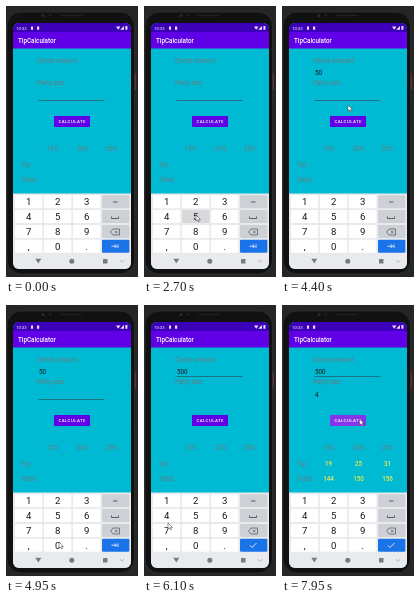
Recreate the animation shown at these times as an HTML page. Size 132x271 px, loop 8 s.

```html
<!DOCTYPE html>
<html lang="en">
<head>
<meta charset="utf-8">
<title>TipCalculator</title>
<style>
html, body { margin: 0; width: 100%; height: 100%; overflow: hidden; background: #262626; }
svg { display: block; width: 132px; height: 271px; }
text { font-family: Roboto, "Noto Sans", sans-serif; font-size: 6.3px; }
.label { fill: #6b7b80; }
.value { fill: #ece84e; font-weight: 500; text-anchor: middle; }
.digit { font-size: 9.6px; fill: #161616; text-anchor: middle; }
.icon { fill: none; stroke: #50545a; stroke-width: .9; }
</style>
</head>
<body>
<svg viewBox="0 0 132 271" xmlns="http://www.w3.org/2000/svg">
  <defs>
    <clipPath id="screen"><rect x="7" y="17" width="118" height="246" rx="6"/></clipPath>
    <clipPath id="face"><rect x="48" y="110" width="36" height="11" rx="1"/></clipPath>
  </defs>
  <rect x="127.5" y="67" width="2" height="17" rx=".8" fill="#84483a"/>
  <rect x="127.5" y="94" width="2" height="29" rx=".8" fill="#1c1c1c"/>
  <rect x="1" y="6" width="127.500" height="262" rx="14" fill="#111" stroke="#303030" stroke-width=".8"/>
  <rect x="54" y="9" width="22" height="1.2" rx=".6" fill="#222"/>
  <g fill="#2b2b2b"><circle cx="37" cy="9.500" r="1.500"/><circle cx="44" cy="9.500" r="1.100"/></g>

  <g clip-path="url(#screen)">
    <rect x="7" y="17" width="118" height="246" fill="#00b9d2"/>
    <rect x="7" y="17" width="118" height="9" fill="#3c00b8"/>
    <rect x="7" y="26" width="118" height="16.500" fill="#5f00e6"/>
    <text id="clock" x="10" y="23.800" fill="#fff" style="font-size:4.3px">10:32</text>
    <g fill="#e8defa">
      <path d="M25 20.400h2v3.400h-2zM31 20.500h2.200v3.200H31z"/>
      <path d="M110 20.400h4.400l-2.200 3.400zM118 20v3.800h-3.800zM119.400 20h2v3.800h-2z"/>
    </g>
    <text x="12" y="37" fill="#fff" font-weight="500">TipCalculator</text>

    <g class="label">
      <text x="31" y="56.6">Check amount</text>
      <text x="31" y="79.4">Party size</text>
      <text x="15" y="160.5">Tip:</text>
      <text x="15" y="175.5">Total:</text>
      <g text-anchor="middle">
        <text x="46.5" y="145.4">15%</text>
        <text x="76.5" y="145.4">20%</text>
        <text x="105.5" y="145.4">25%</text>
      </g>
    </g>
    <text id="amount" x="33" y="69" fill="#151515"></text>
    <text id="party" x="33" y="91.6" fill="#151515"></text>
    <path id="line1" d="M32.500 71.500H98.500"/>
    <path id="line2" d="M32.500 94.500H98.500"/>

    <rect x="48" y="110" width="36" height="11" rx="1" fill="#5f00e6"/>
    <circle id="ripple" cx="78" cy="115" r="0" fill="#d59cf5" opacity=".33" clip-path="url(#face)"/>
    <text x="66.2" y="117.1" fill="#fff" font-weight="500" text-anchor="middle"
      style="font-size:4.4px;letter-spacing:.4px">CALCULATE</text>

    <g id="results" class="value">
      <text x="46.5" y="160.5">19</text><text x="76.5" y="160.5">25</text><text x="105.5" y="160.5">31</text>
      <text x="46.5" y="175.5">144</text><text x="76.5" y="175.5">150</text><text x="105.5" y="175.5">156</text>
    </g>

    <rect x="7" y="187.500" width="118" height="76" fill="#e8eaed"/>
    <g id="keys"></g>
    <g class="icon">
      <path d="M107 196h4.500"/>
      <path d="M105.500 210.500v2h7v-2"/>
      <path d="M104.500 226l2.500-3h6.500v6H107zM109 224.800l2.500 2.500m0-2.500l-2.500 2.500" stroke-width=".7"/>
    </g>
    <g fill="none" stroke="#fff" stroke-width=".8">
      <path id="next" d="M105.500 240.200h5m-1.800-1.800l1.800 1.800-1.800 1.800M112 238.400v3.600"/>
      <path id="done" d="M105.800 240.200l2.300 2.300 4.400-4.500"/>
    </g>
    <g fill="#777b80">
      <path d="M29.300 252.800h6l-3 4.800z"/>
      <circle cx="65.800" cy="255.200" r="2.500"/>
      <rect x="97" y="252.900" width="4.500" height="4.500" rx=".5"/>
      <path d="M114 254.200l2.200 2 2.200-2" fill="none" stroke="#a5a9ad" stroke-width=".8"/>
    </g>
  </g>

  <path id="cursor" d="M0 0V6L1.500 4.800L2.500 7L3.500 6.500L2.600 4.500H4.500Z" fill="#fff" stroke="#333" stroke-width=".5"/>
</svg>
<script>
const LOOP = 8000, STEP = 50;
const $ = id => document.getElementById(id);
const NS = 'http://www.w3.org/2000/svg';

function add(tag, attrs, text = '') {
  const node = document.createElementNS(NS, tag);
  for (const name in attrs) node.setAttribute(name, attrs[name]);
  node.textContent = text;
  $('keys').append(node);
  return node;
}

const keys = {};
['123-', '456_', '789<', ',0.>'].forEach((row, r) => [...row].forEach((char, c) => {
  const x = 9 + c * 29, y = 189.3 + r * 14.8;
  const fill = c < 3 ? '#fff' : r < 3 ? '#cdd1d5' : '#1a73e8';
  keys[char] = add('rect', { x, y, width: 27.4, height: 13, rx: 1.2, fill });
  if (c < 3) add('text', { x: x + 13.7, y: y + 9.9, class: 'digit' }, char);
}));

// Pointer stops: time, x, y
const path = [
  [350, 131, 125], [500, 119, 122], [750, 119, 122], [950, 63, 164],
  [1100, 27, 206], [1250, 52, 209], [2800, 52, 209], [3100, 53, 237],
  [3550, 53, 237], [4350, 66, 99], [4400, 66, 99], [4550, 72, 112],
  [4950, 53, 237], [5250, 53, 237], [5400, 57, 82], [5550, 57, 82],
  [6050, 24, 218], [6100, 24, 218], [6350, 24, 213], [6850, 24, 213],
  [7400, 77.5, 114], [8000, 77.5, 114]
];
// Key presses: key, down, up
const presses = [['5', 2700, 2850], ['0', 3150, 3300], ['0', 5000, 5150], ['4', 6600, 6800]];

const ease = p => p * p * (3 - 2 * p);
const show = (id, on) => $(id).setAttribute('visibility', on ? 'visible' : 'hidden');

function pointer(t) {
  const i = path.findIndex(stop => stop[0] > t);
  const [t0, x0, y0] = path[i - 1], [t1, x1, y1] = path[i];
  const p = ease((t - t0) / (t1 - t0));
  return [x0 + (x1 - x0) * p, y0 + (y1 - y0) * p];
}

function underline(id, focused) {
  $(id).setAttribute('stroke', focused ? '#02bfd2' : '#22626e');
  $(id).setAttribute('stroke-width', .8);
}

function draw(t) {
  $('clock').textContent = t < 400 ? '10:32' : '10:33';

  show('cursor', t >= 350);
  if (t >= 350) $('cursor').setAttribute('transform', `translate(${pointer(t)})`);

  for (const key of '504') {
    const down = presses.some(([k, from, to]) => k === key && t >= from && t < to);
    keys[key].setAttribute('fill', down ? '#d6d8da' : '#fff');
  }

  const typed = presses.filter(([, from]) => t >= from + 100).map(([key]) => key).join('');
  $('amount').textContent = typed.slice(0, 3);
  $('party').textContent = typed.slice(3);

  const second = t >= 5500;
  underline('line1', !second);
  underline('line2', second);
  show('next', !second);
  show('done', second);

  $('ripple').setAttribute('r', t < 7800 ? 0 : 8 + (t - 7800) / 5);
  show('results', t >= 7900);
}

const start = performance.now();
function tick(now) {
  const t = Math.max(0, now - start) % LOOP;
  draw(Math.floor(t / STEP) * STEP);
  requestAnimationFrame(tick);
}
draw(0);
requestAnimationFrame(tick);
</script>
</body>
</html>
```
